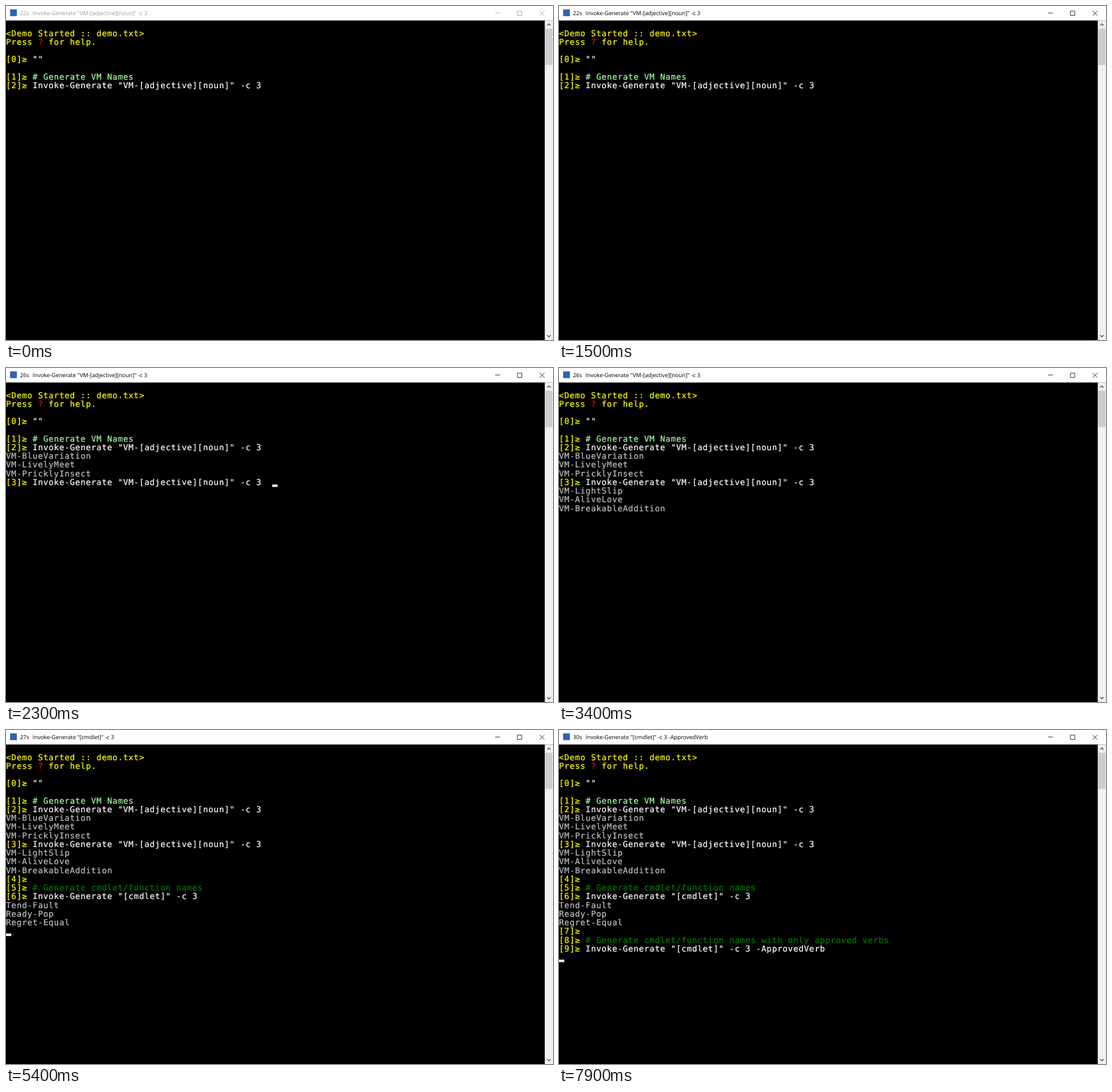
Animation, 957 px wide and 585 px high, one loop 8000 ms. Source, as an HTML page:

```html
<!DOCTYPE html>
<html lang="en">
<head>
<meta charset="utf-8">
<title>Terminal demo</title>
<style>
  html, body { margin: 0; width: 100%; height: 100%; overflow: hidden; background: #000; }
  svg { display: block; width: 957px; height: 585px; }
  text { white-space: pre; text-rendering: geometricPrecision; }
  #screen text {
    font: 17px "DejaVu Sans Mono", monospace;
    letter-spacing: 0.765px;
    stroke-width: 0.25px;
  }
  #bar text { font: 11.63px "Open Sans", "Noto Sans", sans-serif; }
</style>
</head>
<body>
<!-- User units are the window's own pixels: 11 by 18 per character cell. -->
<svg viewBox="0 0 1130 690.75" preserveAspectRatio="none">
  <rect width="1130" height="691" fill="#000"/>
  <rect width="1130" height="30" fill="#fff"/>
  <rect x="8.5" y="7" width="14" height="14" fill="#2f62b8"/>
  <g id="bar">
    <text id="age" x="28.8" y="19"></text>
    <text id="title" x="54.8" y="19"></text>
    <path id="buttons" fill="none" d="M1010.5 14.5h10 M1056.5 10.5h9v9h-9z M1102.5 10l10 10 M1112.5 10l-10 10"/>
  </g>
  <rect x="1113" y="30" width="17" height="661" fill="#f0f0f0"/>
  <rect x="1114" y="47" width="15" height="75" fill="#cdcdcd"/>
  <path d="M1118 40.5l3.5-3.5 3.5 3.5 M1118 680.7l3.5 3.5 3.5-3.5" fill="none" stroke="#505050" stroke-width="1.8"/>
  <g id="screen"></g>
  <rect id="cursor" width="11" height="5" fill="#fff"/>
</svg>
<script>
const LOOP = 8000, COL = 11, ROW = 18, TOP = 30, ASCENT = 14;
const YELLOW = "#ffff00", RED = "#ff0000", WHITE = "#fff", GRAY = "#c0c0c0";
const PALE = "#a4ffa4", GREEN = "#007800";
const $ = id => document.getElementById(id);
const lines = [];

// Each part is [text, colour]; the parts follow one another on the row.
function addLine(start, row, ...parts) {
  const svgNS = "http://www.w3.org/2000/svg";
  const group = document.createElementNS(svgNS, "g");
  let col = 0;
  for (const [text, color] of parts) {
    const node = document.createElementNS(svgNS, "text");
    node.setAttribute("x", col * COL);
    node.setAttribute("y", TOP + row * ROW + ASCENT);
    node.setAttribute("fill", color);
    node.setAttribute("stroke", color);
    node.textContent = text;
    group.append(node);
    col += text.length;
  }
  $("screen").append(group);
  lines.push({ start, group });
}

const prompt = (start, row, n, text = "", color = WHITE) =>
  addLine(start, row, [`[${n}]≥ `, YELLOW], [text, color]);
const output = (start, row, ...texts) =>
  texts.forEach((text, i) => addLine(start, row + i, [text, GRAY]));

const vm = 'Invoke-Generate "VM-[adjective][noun]" -c 3';
const cmdlet = 'Invoke-Generate "[cmdlet]" -c 3';
const approved = cmdlet + " -ApprovedVerb";
const note = "# Generate cmdlet/function names";

addLine(0, 1, ["<Demo Started :: demo.txt>", YELLOW]);
addLine(0, 2, ["Press ", YELLOW], ["?", RED], [" for help.", YELLOW]);
prompt(0, 4, 0, '""');
prompt(0, 6, 1, "# Generate VM Names", PALE);
prompt(0, 7, 2, vm);
output(1600, 8, "VM-BlueVariation", "VM-LivelyMeet", "VM-PricklyInsect");
prompt(2300, 11, 3, vm);
output(2900, 12, "VM-LightSlip", "VM-AliveLove", "VM-BreakableAddition");
prompt(3900, 15, 4);
prompt(3900, 16, 5, note, GREEN);
prompt(3900, 17, 6, cmdlet);
output(5400, 18, "Tend-Fault", "Ready-Pop", "Regret-Equal");
prompt(6000, 21, 7);
prompt(6000, 22, 8, note + " with only approved verbs", GREEN);
prompt(6000, 23, 9, approved);

const titles = [[0, "22s", vm], [2300, "26s", vm], [3900, "27s", cmdlet], [6000, "30s", approved]];

// [time, column, row]; without a place the cursor is hidden.
const cursors = [
  [0], [1000, 50, 7], [1500], [1600, 0, 11], [2300, 50, 11], [2900, 0, 15], [3400],
  [3900, 38, 17], [4400], [4900, 38, 17], [5400, 0, 21],
  [6000, 52, 23], [6800], [7300, 52, 23], [7800], [7900, 0, 24]
];

const latest = (list, t) => list.findLast(item => item[0] <= t);

function draw(t) {
  for (const { start, group } of lines) {
    group.setAttribute("visibility", t >= start ? "visible" : "hidden");
  }
  const [, age, title] = latest(titles, t);
  $("age").textContent = age;
  $("title").textContent = title;
  const color = t >= 500 ? "#000" : "#999";
  $("bar").setAttribute("fill", color);
  $("buttons").setAttribute("stroke", color);

  const [, col, row] = latest(cursors, t);
  const shown = row !== undefined;
  $("cursor").setAttribute("visibility", shown ? "visible" : "hidden");
  if (shown) {
    $("cursor").setAttribute("x", col * COL);
    $("cursor").setAttribute("y", TOP + (row + 1) * ROW - 5);
  }
}

const begin = performance.now();
function tick() {
  draw((performance.now() - begin) % LOOP);
  requestAnimationFrame(tick);
}
tick();
</script>
</body>
</html>
```
